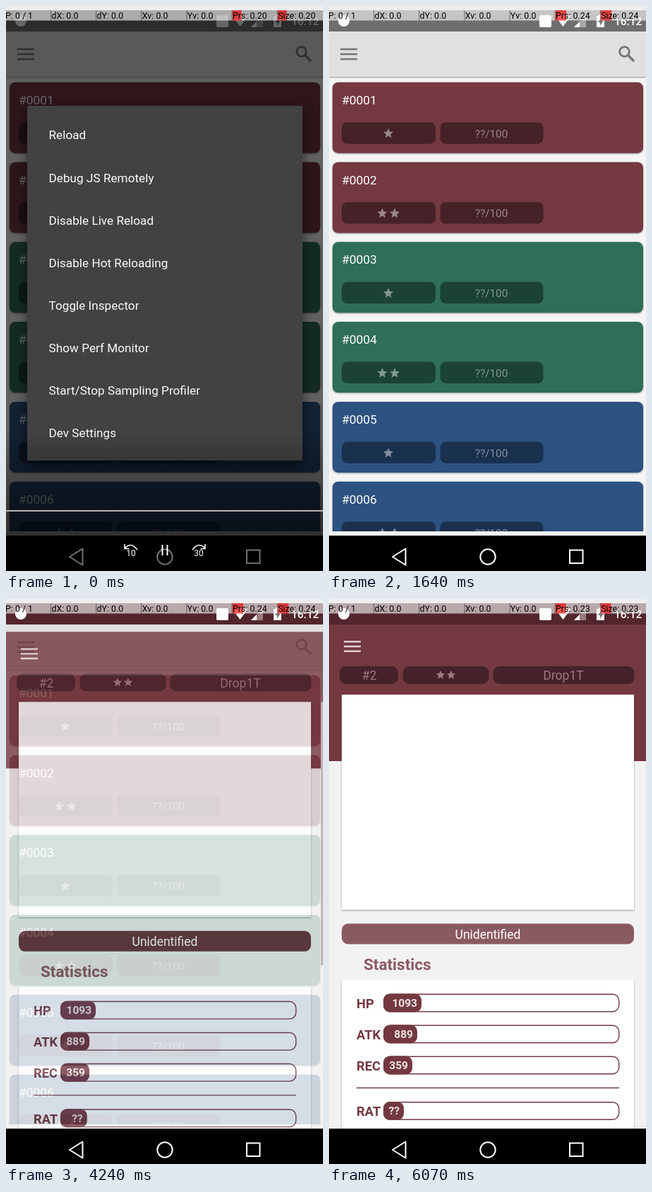
Animation, 449 px wide and 798 px high, one loop 8000 ms. Source, as an HTML page:

```html
<!DOCTYPE html>
<html lang="en">
<head>
<meta charset="utf-8">
<style>
  html, body { margin: 0; width: 100%; height: 100%; overflow: hidden; background: #000; }
  svg { display: block; width: 449px; height: 798px; font-family: Roboto, sans-serif; }
  .lift { filter: drop-shadow(0 1px 1px #0006); }
  .float { filter: drop-shadow(0 6px 8px #0008); }
</style>
</head>
<body>
<svg id="stage" viewBox="0 0 449 798"></svg>
<script>
const LOOP = 8000, RED = '#733840', GREEN = '#2f6e58', BLUE = '#2c5282';

const rect = (x, y, w, h, fill, r = 0, more = '') =>
  `<rect x="${x}" y="${y}" width="${w}" height="${h}" rx="${r}" fill="${fill}" ${more}/>`;
// y is the middle of the capital letters
const text = (x, y, s, size, fill, more = '') =>
  `<text x="${x}" y="${y + size * .355}" font-size="${size}" fill="${fill}" ${more}>${s}</text>`;
const path = (d, fill, more = '') => `<path d="${d}" fill="${fill}" ${more}/>`;
const line = (d, color, w, more = '') => path(d, 'none', `stroke="${color}" stroke-width="${w}" ${more}`);
const mid = 'text-anchor="middle"';

function star(x, y, r, fill) {
  const pts = Array.from({ length: 10 }, (_, i) => {
    const a = i * Math.PI / 5, q = i % 2 ? r * .45 : r;
    return [x + q * Math.sin(a), y - q * Math.cos(a)].map(n => n.toFixed(1));
  });
  return `<polygon points="${pts.join(' ')}" fill="${fill}"/>`;
}

const burger = (x, y, gap, color) =>
  line([-gap, 0, gap].map(d => `M${x} ${y + d}h24`).join(''), color, 2.4);

function card(i) {
  const y = 107.7 + 112.8 * i, soft = '#ffffff73';
  const stars = i % 2 ? [75.5, 93] : [84];
  return rect(5, y, 440, 100, [RED, GREEN, BLUE][i >> 1], 8, 'class="lift"') +
    text(18, y + 25, '#000' + (i + 1), 17.4, '#fff') +
    rect(18, y + 56.5, 133, 30.5, '#0006', 8) +
    rect(157.5, y + 56.5, 146, 30.5, '#0006', 8) +
    stars.map(x => star(x, y + 72.5, 7.5, soft)).join('') +
    text(230, y + 72.5, '??/100', 15.3, soft, mid);
}

const list = rect(0, 36, 449, 712, '#f4f4f4') +
  `<g clip-path="url(#view)">${[0, 1, 2, 3, 4, 5].map(card).join('')}</g>` +
  rect(0, 36, 449, 64, '#e0e0e0', 0, 'class="lift"') +
  burger(16, 68, 7, '#757575') +
  `<circle cx="418.5" cy="64.5" r="6.8" fill="none" stroke="#757575" stroke-width="2.8"/>` +
  line('M423.5 69.5l8.5 8.5', '#757575', 3.2);

// label, y, bar end at the start and at rest
const stats = [
  ['HP', 570.5, 127, 131, '1093'],
  ['ATK', 614.5, 118, 125, '889'],
  ['REC', 658.5, 118, 118, '359'],
  ['RAT', 723, 115, 106, '??']
];
const stat = ([name, y, , , value], i) =>
  text(39, y + .7, name, 18.3, RED, 'font-weight="700"') +
  rect(77.7, y - 12.3, 333, 24.6, '#fff', 9, `stroke="${RED}" stroke-width="1.4"`) +
  rect(77, y - 13, 40, 26, RED, 9, `id="bar${i}"`) +
  text(0, y - .3, value, 15.5, '#f0e6e7', `id="val${i}" font-weight="700" text-anchor="end"`);

const pill = (x, w) => rect(x, 95, w, 25, '#45222a', 9);
const faded = '#9c7a80';
const detail = rect(0, 36, 449, 720, '#f2f2f2') + rect(0, 36, 449, 193, RED) +
  burger(21, 67, 6.7, '#dfcfd2') +
  pill(15, 83) + pill(104.5, 122) + pill(232.5, 200) +
  text(57, 108, '#2', 17.6, faded, mid) +
  star(158, 107.5, 6.7, faded) + star(173, 107.5, 6.7, faded) +
  text(332, 108, 'Drop1T', 17.6, faded, mid) +
  rect(18, 135, 414, 304, '#fff', 0, 'class="lift"') +
  rect(18, 458.5, 414, 29, '#8a5a62', 9, 'id="tag"') +
  text(225, 473.5, 'Unidentified', 17.5, '#fff', mid) +
  text(49, 516, 'Statistics', 22.5, '#8a5a62', 'font-weight="700"') +
  rect(18, 537, 414, 260, '#fff', 0, 'class="lift"') +
  stats.map(stat).join('') +
  line('M39 690.5H411', RED, 1.4) +
  rect(446, 135, 3, 372, '#b5a6a8', 0, 'id="scroll"');

const menu = ['Reload', 'Debug JS Remotely', 'Disable Live Reload', 'Disable Hot Reloading',
  'Toggle Inspector', 'Show Perf Monitor', 'Start/Stop Sampling Profiler', 'Dev Settings'];
const dialog = rect(30, 141, 390, 501, '#424242', 2, 'class="float"') +
  menu.map((s, i) => text(60.5, 182.3 + 60.15 * i, s, 17.2, '#fafafa')).join('');

const status = rect(0, 0, 449, 36, '#6e6e6e', 0, 'id="status"') +
  '<circle cx="21" cy="21" r="8" fill="#fff"/>' +
  rect(298, 13, 17, 17, '#fff', 2) +
  path('M321 15Q331.500 8 342 15L331.500 29z', '#fff') +
  path('M364 13V30H347z', '#fff6') + path('M355 22V30H347z', '#fff') +
  path('M379 14h3v-2h5v2h3v16h-11z', '#fff') + path('M386 15l-5 8h3v5l5-8h-3z', '#777') +
  text(404, 21.500, '16:12', 15.5, '#fff', 'font-weight="500"');

const CELL = 449 / 7;
const labels = ['P: 0 / 1', 'dX: 0.0', 'dY: 0.0', 'Xv: 0.0', 'Yv: 0.0', 'Prs: ', 'Size: '];
const strip = rect(0, 0, 449, 6, '#eee') + rect(0, 6, 449, 14.5, '#fff9') +
  labels.map((s, i) =>
    (i ? rect(i * CELL - 1, 6, 1, 14.5, '#0007') : '') +
    (i > 4 ? rect(i * CELL, 6, 14, 14.5, '#f00000a8', 0, `id="red${i}"`) : '') +
    text(i * CELL + (i ? .3 : -1), 13.7, s, 12.4, '#000', `id="lab${i}"`)).join('');

const nav = rect(0, 748, 449, 50, '#000') +
  line('M90 778L108.500 766.500V789.500z', '#fff', 2, 'stroke-linejoin="round"') +
  '<circle cx="225" cy="778" r="10.700" fill="none" stroke="#fff" stroke-width="2"/>' +
  line('M341 768.500h18.500v18.500h-18.500z', '#fff', 2);

const skip = (x, s, dir) =>
  line(`M${x - 9 * dir} 768Q${x} 756 ${x + 9 * dir} 766M${x + 9 * dir} 760v6.500h${-6.5 * dir}`, '#fff', 1.6) +
  text(x, 773, s, 12, '#fff', mid);
const controls = rect(0, 600, 449, 198, 'url(#shade)') +
  rect(0, 712, 449, 2, '#b4b4b4') +
  skip(177, '10', -1) + skip(273, '30', 1) +
  line('M221.500 761v15M228.500 761v15', '#fff', 2);

document.getElementById('stage').innerHTML =
  `<defs><clipPath id="view"><path d="M0 36H449V742H0z"/></clipPath>
   <linearGradient id="shade" x2="0" y2="1"><stop stop-color="#000" stop-opacity="0"/>
   <stop offset=".5" stop-color="#000" stop-opacity=".4"/>
   <stop offset="1" stop-color="#000" stop-opacity=".6"/></linearGradient></defs>` +
  list + `<g id="detail">${detail}</g>` + status +
  `<g id="dialog">${rect(0, 0, 449, 748, '#000', 0, 'opacity=".6"')}${dialog}</g>` +
  strip + nav + `<g id="controls">${controls}</g>`;

const set = (id, attrs) => {
  const el = document.getElementById(id);
  for (const k in attrs) el.setAttribute(k, attrs[k]);
};
const ramp = (t, a, b) => Math.min(1, Math.max(0, (t - a) / (b - a)));
const mix = (a, b, u) => a + (b - a) * u;
const blend = (a, b, u) => `rgb(${a.map((n, i) => Math.round(mix(n, b[i], u)))})`;

function draw(t) {
  set('controls', { opacity: 1 - ramp(t, 50, 350) });
  set('dialog', { opacity: 1 - ramp(t, 230, 520) });

  const enter = 1 - (1 - ramp(t, 4090, 4540)) ** 4;
  set('detail', { opacity: enter, transform: `translate(0 ${53 * (1 - enter)})` });
  set('status', { fill: blend([110, 110, 110], [82, 38, 44], ramp(t, 4060, 4200)) });
  set('tag', { fill: blend([100, 44, 55], [138, 90, 98], ramp(t, 4240, 4580)) });
  set('scroll', { opacity: 1 - ramp(t, 4700, 4950) });

  const grow = ramp(t, 4220, 5170);
  stats.forEach(([, , from, to], i) => {
    const end = mix(from, to, grow);
    set('bar' + i, { width: end - 77 });
    set('val' + i, { x: end - 6 });
  });

  const press = t < 200 ? .2 : t < 1200 ? .22 : t < 5700 ? .24 : .23;
  for (const i of [5, 6]) {
    set('red' + i, { width: press * CELL });
    document.getElementById('lab' + i).textContent = labels[i] + press.toFixed(2);
  }
}

const start = performance.now();
function tick() {
  draw((performance.now() - start) % LOOP);
  requestAnimationFrame(tick);
}
tick();
</script>
</body>
</html>
```
